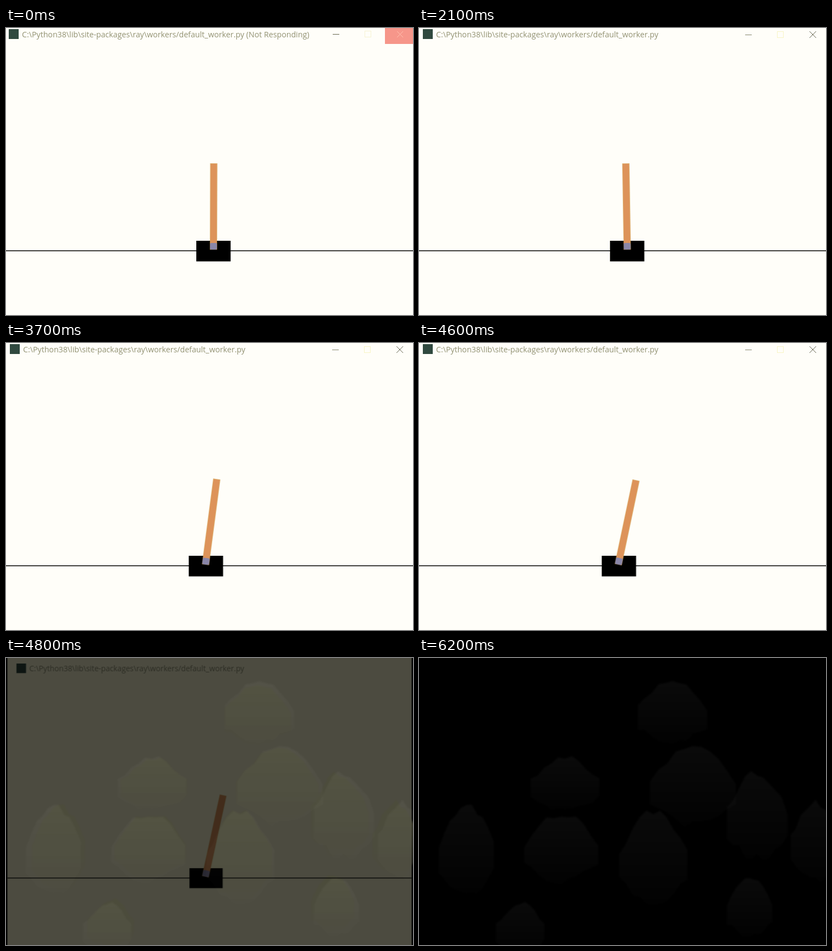
These frames come from a looping animation (740x522 px, 6300 ms). An HTML page:

```html
<!DOCTYPE html>
<html lang="en">
<head>
<meta charset="utf-8">
<title>Cart pole</title>
<style>
  html, body { margin: 0; width: 740px; height: 522px; overflow: hidden; background: #000; }
  svg { display: block; }
  text { font: 14.2px "Open Sans", "Noto Sans", sans-serif; fill: #929273; }

  .win, .paper, .tint, .hung, .live, .buttons, .cart, .pole { animation: 6300ms step-end infinite; }
  .win { animation-name: close; transform-origin: 370px 245px; }
  .paper { fill: #fffef9; animation-name: paper; }
  .tint { fill: url(#warm); animation-name: tint; }
  .hung { animation-name: hung; }
  .live { animation-name: live; }
  .buttons { animation-name: buttons; }
  .cart { animation-name: drive; }
  .pole { animation-name: fall; transform-origin: 377.2px 397px; }
  .clouds { fill: url(#dim); }

  @keyframes hung { 0% { opacity: 1 } 15.87%, 100% { opacity: 0 } }
  @keyframes live { 0% { opacity: 0 } 15.87%, 100% { opacity: 1 } }
  @keyframes buttons { 0% { opacity: 1 } 74.6%, 100% { opacity: 0 } }
  @keyframes paper { 0% { fill: #fffef9 } 74.6%, 100% { fill: #fdfbd8 } }
  @keyframes tint { 0% { opacity: 0 } 74.6%, 100% { opacity: 1 } }
  @keyframes close {
    0% { opacity: 1; transform: none }
    74.6% { opacity: .79; transform: scale(.991) }
    76.19% { opacity: .3; transform: scale(.967) }
    77.77%, 100% { opacity: 0; transform: scale(.95) }
  }
  /* One step for every 100 ms between the poses. */
  @keyframes drive {
    0%, 25.39% { transform: none; animation-timing-function: steps(5) }
    33.33% { transform: translateX(1.3px); animation-timing-function: steps(3) }
    38.09% { transform: translateX(.2px); animation-timing-function: steps(13) }
    58.73%, 100% { transform: translateX(-13.7px) }
  }
  @keyframes fall {
    0% { transform: rotate(.2deg) }
    15.87% { transform: rotate(.2deg); animation-timing-function: steps(11) }
    33.33% { transform: rotate(-.95deg); animation-timing-function: steps(3) }
    38.09% { transform: rotate(-.2deg); animation-timing-function: steps(13) }
    58.73% { transform: rotate(7.5deg); animation-timing-function: steps(9) }
    73.01% { transform: rotate(11.9deg) }
    74.6%, 100% { transform: rotate(12.3deg) }
  }
</style>
</head>
<body>
<svg width="740" height="522" viewBox="0 0 740 522">
  <defs>
    <linearGradient id="dim" x2="0" y2="1">
      <stop stop-color="#fff" stop-opacity=".04"/>
      <stop offset="1" stop-color="#fff" stop-opacity=".008"/>
    </linearGradient>
    <linearGradient id="warm" x2="0" y2="1">
      <stop stop-color="#ffffc2" stop-opacity=".85"/>
      <stop offset="1" stop-color="#ffffc2" stop-opacity=".2"/>
    </linearGradient>
    <filter id="soft"><feGaussianBlur stdDeviation="1.5"/></filter>
    <g id="clouds" filter="url(#soft)"></g>
  </defs>

  <rect width="740" height="522"/>
  <use href="#clouds" class="clouds"/>

  <g class="win">
    <rect class="paper" x="-10" y="-10" width="760" height="542"/>
    <use href="#clouds" class="tint"/>

    <g class="hung">
      <rect x="5" y="2" width="18" height="18" fill="#30493f"/>
      <text x="29" y="17">C:\Python38\lib\site-packages\ray\workers/default_worker.py (Not Responding)</text>
      <rect x="689" y="0" width="61" height="29" fill="#f6968a"/>
      <g fill="none">
        <path d="M594 11.5h12" stroke="#66664c"/>
        <rect x="652.5" y="5.5" width="11" height="11" stroke="#f6f3d2"/>
        <path d="M711 6l11 11m0-11l-11 11" stroke="#ffc0ae"/>
      </g>
    </g>

    <g class="live">
      <rect x="7" y="2" width="18" height="18" fill="#30493f"/>
      <text x="31" y="17">C:\Python38\lib\site-packages\ray\workers/default_worker.py</text>
      <g class="buttons" fill="none">
        <path d="M593 12.5h12" stroke="#85856c"/>
        <rect x="651.5" y="6.5" width="11" height="11" stroke="#f8f4c4"/>
        <path d="M710 6l12 12m0-12l-12 12" stroke="#66664f"/>
      </g>
    </g>

    <path d="M-10 405.2h760" stroke="#000" stroke-width="1.4"/>
    <g class="cart">
      <rect x="346" y="387" width="62.4" height="37.5"/>
      <g class="pole">
        <rect x="371" y="246.5" width="12.4" height="156.5" fill="#dd935a" stroke="#d2ac55" stroke-width=".5"/>
        <rect x="371" y="391" width="12.4" height="12" rx="2" fill="#8a86a8"/>
      </g>
    </g>
  </g>
</svg>
<script>
  let seed = 7;
  const random = () => (seed = seed * 16807 % 2147483647) / 2147483647;

  // A dome with a lumpy top and a ragged, shallower underside.
  function cloud(x, y, w, h) {
    const top = [], bottom = [];
    for (let u = 0; u <= 1; u += .1) {
      const edge = 1 - Math.sin(Math.PI * u);
      const lump = () => (random() - .5) * h * .1;
      top.push([x + w * u, y + h * .45 * edge + lump()]);
      bottom.unshift([x + w * u, y + h * (1 - .25 * edge) + lump()]);
    }
    const shape = document.createElementNS("http://www.w3.org/2000/svg", "path");
    shape.setAttribute("d", `M${top.concat(bottom).join("L")}Z`);
    document.getElementById("clouds").append(shape);
  }

  cloud(398, 40, 126, 114);
  cloud(203, 180, 125, 96);
  cloud(420, 160, 156, 142);
  cloud(36, 266, 100, 164);
  cloud(191, 284, 135, 122);
  cloud(364, 282, 124, 160);
  cloud(560, 208, 110, 156);
  cloud(676, 262, 90, 140);
  cloud(560, 398, 82, 110);
  cloud(140, 446, 88, 90);
</script>
</body>
</html>
```
